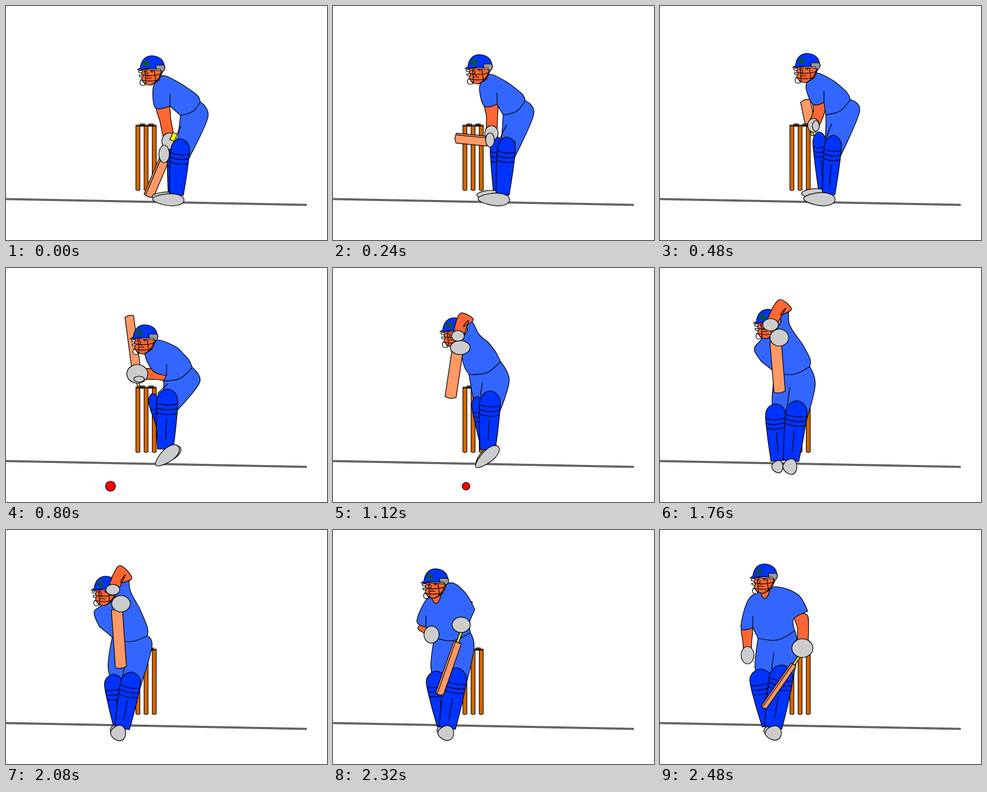
An HTML page with a canvas for the animation above (2.56 s loop, 550 by 400 pixels).

```html
<!DOCTYPE html>
<html lang="en">
<head>
<meta charset="utf-8">
<title>Batsman</title>
<style>
html, body { margin: 0; width: 100%; height: 100%; overflow: hidden; background: #fff; }
canvas { display: block; }
</style>
</head>
<body>
<canvas id="stage" width="550" height="400"></canvas>
<script>
const ctx = document.getElementById('stage').getContext('2d');
const STEP = 80, STEPS = 32;
const BLUE = '#3366ff', DEEP = '#0033ff', SKIN = '#ff6633', GREY = '#cccccc', WOOD = '#ff9966', STUMP = '#cc6600';

// Joints of the figure. head: offset; bat: x, y, angle, length, width; pads: knee, ankle, width;
// shoe: x, y, radii, angle; hands: x, y, radii; arm: shoulder, elbow; front and back: shirt edges.
const poses = keys([
  { at: 0, head: '0,0', bat: '271,262,113,69,17', waist: '299,187 333,164', hip: '346,190', thigh: '293,235',
    front: '262,124 252,140 256,174 281,171', back: '328,153 312,141 295,130 272,119', arm: '268,170 273,195',
    far: '288,232 286,318 22', near: '300,227 292,323 32', shoe: '278,331,27,10,2',
    upper: '280,231 13,14', lower: '271,253 9,15' },
  { at: 6, head: '2,-4', bat: '257,200,258,40,17', waist: '284,186 326,160', hip: '342,180', thigh: '283,225',
    front: '260,120 250,138 262,168 281,165', back: '322,150 310,138 296,127 272,115', arm: '273,164 272,182',
    far: '272,215 280,313 23', near: '298,221 289,322 29', shoe: '273,330,27,11,2',
    upper: '263,204 10,12', lower: '267,205 6,9' },
  { at: 10, head: '-12,12', bat: '224,180,262.5,99,15', waist: '270,193 319,170', hip: '332,195', thigh: '269,212',
    front: '248,135 238,148 252,176 275,184', back: '314,158 304,147 290,134 260,123', arm: '278,181 258,181',
    far: '250,215 280,308 21', near: '277,207 273,310 36', shoe: '276,321,25,11,-40',
    upper: '225,181 18,16', lower: '228,190 9,5' },
  { at: 14, head: '-42,0', bat: '213,143,98.5,80,19', waist: '233,182 287,160', hip: '302,192', thigh: '241,225',
    front: '222,115 221,140 222,158 227,173', back: '279,144 265,126 250,113 236,90', arm: '232,94 225,84',
    far: '246,220 262,308 22', near: '270,210 265,311 35', shoe: '264,323,26,10,-42',
    upper: '214,116 11,9', lower: '218,136 17,12' },
  { at: 18, head: '-51,-23', bat: '206,116,84.6,74,20', waist: '212,173 271,156', hip: '282,200', thigh: '209,220',
    front: '210,82 184,114 172,138 190,157', back: '272,144 258,125 231,90 229,60', arm: '226,64 219,55',
    far: '212,217 210,325 37', near: '255,211 250,320 38', shoe: '253,332,11,13,0',
    upper: '196,92 15,12', lower: '212,112 16,15' },
  { at: 26, head: '-79,-6', bat: '190,136,86,100,19', waist: '182,183 242,181', hip: '250,200', thigh: '175,235',
    front: '195,92 166,127 151,140 160,165', back: '242,166 228,132 213,104 209,80', arm: '206,86 199,69',
    far: '182,247 196,334 32', near: '217,243 199,339 34', shoe: '192,347,13,13,0',
    upper: '183,102 12,9', lower: '197,126 16,14' },
  { at: 31, head: '-71,-27', bat: '229,230,125,90,10', waist: '168,185 231,172', hip: '236,205', thigh: '163,236',
    front: '166,107 149,124 139,168 159,167', back: '229,152 253,139 237,111 200,97', arm: '241,146 245,168',
    far: '169,238 189,334 38', near: '211,231 194,338 40', shoe: '194,347,14,12,0',
    upper: '244,202 18,16', lower: '150,214 11,15' }
]);
const flight = keys([
  { at: 9, spot: '104,392' }, { at: 10, spot: '179,373' }, { at: 12, spot: '204,225' },
  { at: 14, spot: '228,373' }, { at: 15, spot: '240,387' }
]);

const stance = 'bat pants far farShoe arm shirt upper lower grip near shoe head'.split(' ');
const stroke = 'pants far farShoe near shoe shirt head arm bat lower upper'.split(' ');
const rest = 'pants far farShoe near shoe arm farArm shirt neck head bat upper lower'.split(' ');

function keys(list) {
  for (const key of list)
    for (const name in key)
      if (name !== 'at') key[name] = key[name].split(/[ ,]/).map(Number);
  return list;
}

const lerp = (a, b, k) => a + (b - a) * k;
const between = (p, q, k) => [lerp(p[0], q[0], k), lerp(p[1], q[1], k)];
const pairs = flat => flat.flatMap((x, i) => i % 2 ? [] : [[x, flat[i + 1]]]);

function sample(list, step) {
  let i = 0;
  while (i < list.length - 2 && step >= list[i + 1].at) i++;
  const { at, ...from } = list[i], to = list[i + 1], k = (step - at) / (to.at - at);
  for (const name in from) from[name] = from[name].map((v, n) => lerp(v, to[name][n], k));
  return from;
}

function paint(path, fill, line = '#000') {
  if (fill) { ctx.fillStyle = fill; ctx.fill(path); }
  ctx.strokeStyle = line;
  ctx.stroke(path);
}

const shape = (d, fill, line) => paint(new Path2D(d), fill, line);

// Closed smooth curve through the points, with sharp corners where asked.
function blob(points, fill, sharp = []) {
  const n = points.length, path = new Path2D();
  const slope = points.map((_, i) => {
    const p = points[(i + n - 1) % n], q = points[(i + 1) % n];
    return sharp.includes(i) ? [0, 0] : [(q[0] - p[0]) / 6, (q[1] - p[1]) / 6];
  });
  path.moveTo(...points[0]);
  points.forEach((p, i) => {
    const j = (i + 1) % n, q = points[j];
    path.bezierCurveTo(p[0] + slope[i][0], p[1] + slope[i][1], q[0] - slope[j][0], q[1] - slope[j][1], ...q);
  });
  path.closePath();
  paint(path, fill);
}

// Both edges of a limb that follows the centres with the given widths.
function edges(centres, widths) {
  const side = sign => centres.map((c, i) => {
    const p = centres[Math.max(i - 1, 0)], q = centres[Math.min(i + 1, centres.length - 1)];
    const dx = q[0] - p[0], dy = q[1] - p[1], r = sign * widths[i] / 2 / Math.hypot(dx, dy);
    return [c[0] + dy * r, c[1] - dx * r];
  });
  return [side(1), side(-1)];
}

function limb(centres, widths) {
  const [right, left] = edges(centres, widths);
  blob([...right, ...left.reverse()], SKIN);
}

// Ellipse, narrower at its left end by the taper.
function egg([x, y, rx, ry, angle = 0], taper = 0) {
  const turn = angle * Math.PI / 180, points = [];
  for (let i = 0; i < 10; i++) {
    const a = i * Math.PI / 5, u = rx * Math.cos(a), v = ry * Math.sin(a) * (1 + taper * Math.cos(a));
    points.push([x + u * Math.cos(turn) - v * Math.sin(turn), y + u * Math.sin(turn) + v * Math.cos(turn)]);
  }
  blob(points, GREY);
}

function drawPad([x, y, footX, footY, width], step) {
  const knee = [x, y], foot = [footX, footY], length = Math.hypot(footX - x, footY - y);
  const along = k => between(knee, foot, k);
  const [right, left] = edges([0.13, 0.5, 1].map(along), [width * 0.94, width * 0.96, width * 0.74]);
  blob([knee, ...right, ...left.reverse()], DEEP, [3, 4]);
  for (const drop of [25, 33, 41]) {
    const centre = along(drop / length), [[b], [a]] = edges([centre, foot], [width * 0.95, 0]);
    shape(`M${a}Q${centre[0]} ${centre[1] + 5} ${b}`);
  }
  if (step > 5) shape(`M${along(0.5)}L${along(0.85)}`);
}

function drawShirt({ front, back, waist }, step) {
  const chest = pairs(front), [a, b] = pairs(waist);
  const hem = [(a[0] + b[0] - (b[1] - a[1]) * 0.3) / 2, (a[1] + b[1] + (b[0] - a[0]) * 0.3) / 2];
  blob([...chest, a, hem, b, ...pairs(back)], BLUE, [3, 4, 6, 8]);
  if (step < 12 || step > 27) shape(`M${chest[3]}v-20`);
}

function drawPants({ waist, hip, thigh, near, far }) {
  const [a, b] = pairs(waist), [knee, foot] = pairs(near), [farKnee, farFoot] = pairs(far);
  const seat = between(knee, foot, 0.35), half = near[4] / 2;
  blob([a, b, hip, [seat[0] + half, seat[1]], between(knee, foot, 0.6), between(farKnee, farFoot, 0.3), thigh],
    BLUE, [0, 1, 3, 4, 5]);
  const end = [knee[0] - half, knee[1] + 8];
  shape(`M${between(between(a, b, 0.5), end, 0.5)}L${end}`);
}

function drawBat([x, y, angle, length, width], step, gripOnly) {
  const h = width / 2;
  ctx.save();
  ctx.translate(x, y);
  ctx.rotate(angle * Math.PI / 180);
  if (gripOnly) shape('M-48 -4h13v8h-13z', '#ffff00');
  else {
    shape('M-22 -2H0V2H-22z', '#ffff33');
    shape(`M0 ${-h}H${length - 2}Q${length + 3} 0 ${length - 1} ${h}H0z`, WOOD);
    if (step < 4 || step > 27) shape(`M0 ${h - 3}H${length - 1}`);
  }
  ctx.restore();
}

function drawHead() {
  shape('M232 108L233 127Q239 136 249 135L262 127L269 111z', SKIN);
  shape('M231 126Q227 134 233 136L239 135L234 128z', '#fff');
  shape('M227 111L234 110L233 114H228zM228 118H235L234 121H229z', '#fff');
  shape('M236 111.500L242 111M247 111L253 110M237 113h4M248 112.500h4M243 113L241 119L245 120M239 124Q244 122 249 124');
  shape('M234 118Q250 121 267 116M234 127Q250 130 262 126M254 110L257 131M266 113Q262 128 249 135M238 110L240 133');
  shape('M225 109L230 106C232 91 239 85 251 85C264 86 271 94 272 106L258 108Q242 106 231 109z', DEEP);
  shape('M257 101H270Q274 104 271 110L267 113L264 108H257z', '#999999');
  ctx.fillStyle = '#064f50';
  ctx.beginPath();
  ctx.arc(241, 98, 5.5, 0, 7);
  ctx.fill();
}

function drawGround() {
  ctx.lineWidth = 3;
  shape('M0 330L515 340');
  ctx.lineWidth = 1;
  shape('M0 330L514 340', null, GREY);
  for (const x of [222.5, 236.5, 250.5]) shape(`M${x} 205h7v109.500q-3.500 2-7 0z`, STUMP);
  shape('M222.500 203.500h35v2h-35zM229.500 201.500h8v3h-8zM244.500 201.500h8v3h-8z', STUMP);
}

function atHead(pose, drawing) {
  ctx.save();
  ctx.translate(...pose.head);
  drawing();
  ctx.restore();
}

const parts = {
  bat: (p, step) => drawBat(p.bat, step),
  grip: (p, step) => step < 4 && drawBat(p.bat, step, true),
  pants: drawPants,
  shirt: drawShirt,
  far: (p, step) => drawPad(p.far, step),
  near: (p, step) => drawPad(p.near, step),
  shoe: p => egg(p.shoe, 0.25),
  farShoe({ shoe: [x, y, rx, ry, angle], near, far }) {
    egg([x + far[2] - near[2], y + far[3] - near[3], rx * 0.8, ry * 0.8, angle], 0.25);
  },
  arm: p => limb([...pairs(p.arm), p.upper], [21, 19, 15]),
  farArm({ front, lower }) {
    const [, , a, b] = pairs(front), sleeve = between(a, b, 0.5);
    limb([sleeve, between(sleeve, lower, 0.5), lower], [18, 15, 11]);
  },
  upper: p => egg(p.upper),
  lower: p => egg(p.lower),
  head: p => atHead(p, drawHead),
  neck: p => atHead(p, () => shape('M243 131Q245 144 251 144Q256 143 259 131z', SKIN))
};

function drawBall(step) {
  if (step < 9 || step > 15) return;
  const path = new Path2D();
  path.arc(...sample(flight, step).spot, 13.5 - step / 2, 0, 7);
  paint(path, '#ff0000');
}

function draw() {
  const step = Math.floor(performance.now() / STEP) % STEPS;
  const pose = sample(poses, step);
  const order = step < 12 ? stance : step < 28 ? stroke : rest;
  ctx.fillStyle = '#fff';
  ctx.fillRect(0, 0, 550, 400);
  ctx.lineJoin = 'round';
  drawGround();
  ctx.lineWidth = 1.2;
  for (const name of order) parts[name](pose, step);
  drawBall(step);
  requestAnimationFrame(draw);
}
draw();
</script>
</body>
</html>
```
